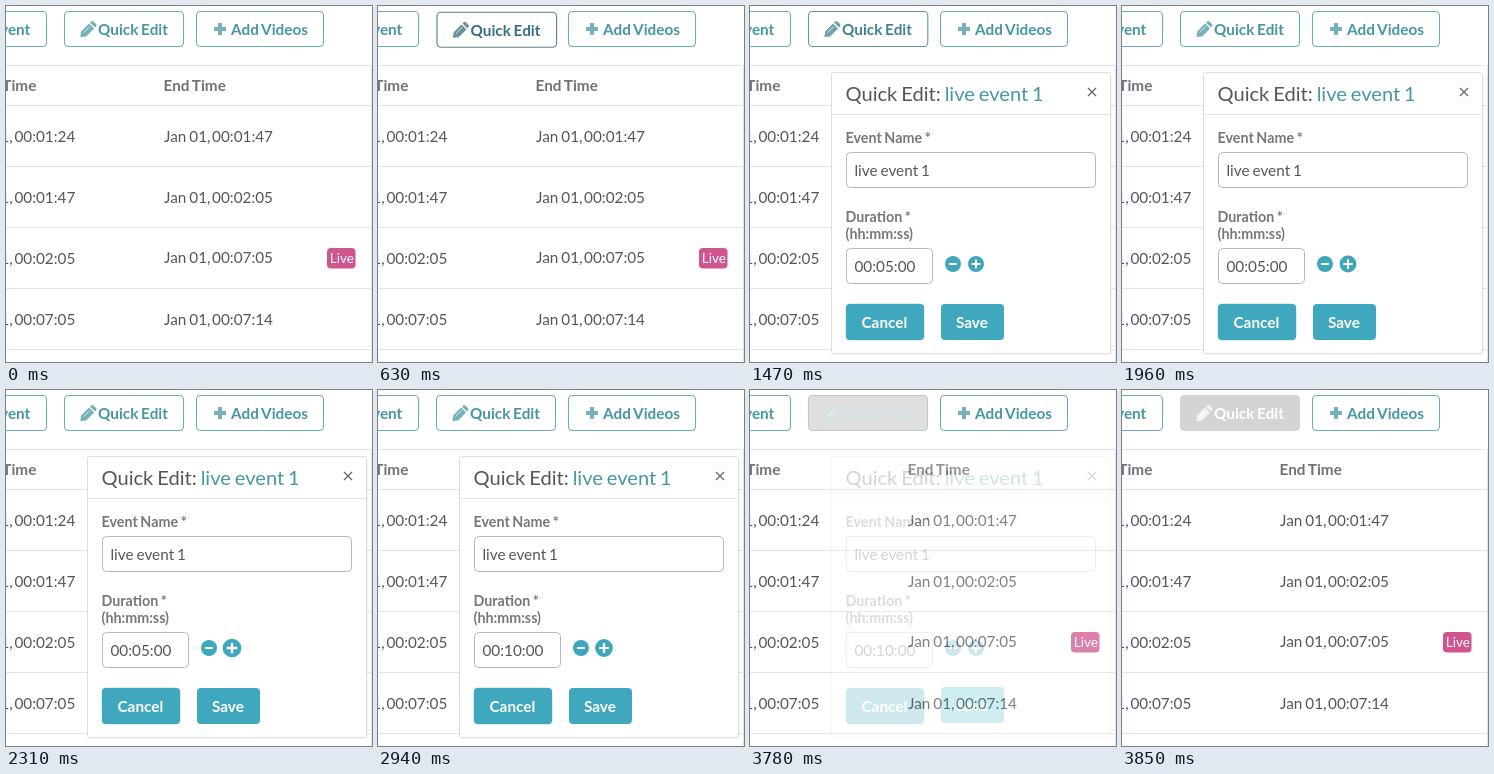
Recreate the animation shown at these times as an HTML page. Size 366 px wide and 356 px high, loop 4760 ms.

```html
<!DOCTYPE html>
<html lang="en">
<head>
<meta charset="utf-8">
<title>Quick edit panel</title>
<style>
  html, body { margin: 0; width: 100%; height: 100%; overflow: hidden; background: #fff; }
  svg { display: block; width: 366px; height: 356px; font: 15.3px Lato, sans-serif; fill: #565656; }
  text { white-space: pre; word-spacing: -.06em; }
  .b { font-weight: 700; }
  .teal { fill: #4697a3; }
  .label { font-weight: 700; font-size: 14.3px; fill: #777; }
  .white { fill: #fff; }
  .box { fill: #fff; stroke: #66adb6; stroke-width: 1.1; }
  .field { fill: #fff; stroke: #b9b9b9; }
  .rule { stroke: #e4e4e4; fill: none; }
  .icon { opacity: .75; }
</style>
</head>
<body>
<svg viewBox="0 0 366 356">
  <rect class="box" x="-60.5" y="5.5" width="101" height="35" rx="4"/>
  <text class="b teal" x="24.3" y="29" text-anchor="end">Edit Event</text>

  <g id="edit">
    <rect id="editBox" x="58.5" y="5.5" height="35" rx="4" stroke-width="1.1"/>
    <g id="editInk">
      <path class="icon" d="M74.3 31 L75.2 25.4 L83 17.6 L88 22.6 L80.2 30.4 Z M84 16.6 L85.3 15.4 Q86.4 14.6 87.4 15.5 L90 18.1 Q90.9 19.2 90.1 20.3 L89 21.6 Z"/>
      <path d="M77.6 26.6 L83.5 20.7" stroke="#fff" stroke-width=".8"/>
      <text class="b" x="92" y="29">Quick Edit</text>
    </g>
  </g>

  <rect class="box" x="190.5" y="5.5" width="127" height="35" rx="4"/>
  <path class="teal icon" d="M212 17h4v4h4v4h-4v4h-4v-4h-4v-4h4z"/>
  <text class="b teal" x="225" y="29">Add Videos</text>

  <path class="rule" d="M0 59.5H365.5V356"/>
  <g class="b" fill="#727272">
    <text x="30.3" y="85" text-anchor="end">Start Time</text>
    <text x="157.6" y="85">End Time</text>
  </g>
  <g id="rows"></g>
  <rect x="321" y="242" width="28.5" height="20.5" rx="4" fill="#d0558f"/>
  <text class="white" x="323.7" y="257" font-size="13.6">Live</text>

  <g id="panel">
    <rect x="81" y="67" width="281" height="282" rx="2" fill="#000" opacity=".035"/>
    <rect x="81.5" y="66.5" width="279" height="281" rx="2" fill="#fff" stroke="#dedede"/>
    <path class="rule" d="M82 108.5H360"/>
    <text x="95.5" y="95" font-size="20.1">Quick Edit: <tspan class="teal">live event 1</tspan></text>
    <path d="M338 82l8 8m0-8l-8 8" stroke="#666" stroke-width="1.3"/>
    <text class="label" x="95.5" y="137">Event Name *</text>
    <rect class="field" x="96.5" y="146.5" width="249" height="35" rx="4"/>
    <text x="104.5" y="170">live event 1</text>
    <text class="label" x="95.5" y="216">Duration *</text>
    <text class="label" x="95.5" y="233">(hh:mm:ss)</text>
    <rect class="field" x="96.5" y="242.5" width="86" height="35" rx="4"/>
    <text id="length" x="104.5" y="266"></text>
    <g fill="#3fa6bb" stroke="#fff" stroke-width="2">
      <g><circle cx="203" cy="258" r="8" stroke="none"/><path d="M199 258h8"/></g>
      <g id="plus"><circle r="8" stroke="none"/><path d="M-4.5 0h9M0-4.5v9"/></g>
    </g>
    <rect x="95.5" y="297.5" width="79" height="37" rx="4.5" fill="#b7dfe8"/>
    <rect x="96" y="298" width="78" height="36" rx="4" fill="#3fa8bf"/>
    <text class="b white" x="111.5" y="321.5">Cancel</text>
    <g id="save">
      <rect id="saveBox" x="191" y="298" width="63" height="36" rx="4"/>
      <text class="b white" x="206" y="321.5">Save</text>
    </g>
  </g>
</svg>
<script>
  const LOOP = 4760, STEP = 70;
  const $ = id => document.getElementById(id);

  const times = ['00:01:24', '00:01:47', '00:02:05', '00:07:05', '00:07:14'];
  const stamp = time => `Jan 01, <tspan dx="-1.4">${time}</tspan>`;
  $('rows').innerHTML = times.slice(0, 4).map((start, i) => {
    const y = 99.5 + 61 * i;
    return `<path class="rule" d="M0 ${y}H365"/>
      <text x="69.3" y="${y + 36.5}" text-anchor="end">${stamp(start)}</text>
      <text x="158" y="${y + 36.5 - (i === 2)}">${stamp(times[i + 1])}</text>`;
  }).join('') + '<path class="rule" d="M0 343.5H365"/>';

  const ramp = (t, a, b) => Math.min(1, Math.max(0, (t - a) / (b - a)));
  const pulse = (t, a, b, c, d) => ramp(t, a, b) - ramp(t, c, d);
  const mix = (from, to, k) =>
    `rgb(${from.map((v, i) => Math.round(v + (to[i] - v) * k))})`;

  const TEAL = [70, 151, 163], DARK = [56, 110, 126], WHITE = [255, 255, 255];
  const EDGE = [102, 173, 182], DARK_EDGE = [84, 130, 144], GREY = [212, 212, 212];
  const SAVE = [63, 168, 191], BRIGHT = [70, 187, 215];

  function draw(t) {
    const hover = pulse(t, 560, 630, 1330, 1610);
    const press = pulse(t, 560, 630, 630, 840);
    const off = ramp(t, 3570, 3850);
    const plus = pulse(t, 1890, 2100, 2870, 3080);
    const save = ramp(t, 3150, 3360);

    $('edit').setAttribute('transform', `translate(${0.5 * press} ${0.8 * press})`);
    $('editBox').setAttribute('width', 119 + 0.6 * hover);
    $('editBox').style.fill = mix(WHITE, GREY, off);
    $('editBox').style.stroke = off ? mix(EDGE, GREY, off) : mix(EDGE, DARK_EDGE, hover);
    $('editInk').style.fill = off ? mix(TEAL, WHITE, off) : mix(TEAL, DARK, hover);
    $('panel').style.opacity = pulse(t, 700, 910, 3570, 3850);
    $('length').textContent = t < 2380 ? '00:05:00' : '00:10:00';
    $('plus').setAttribute('transform', `translate(226 258) scale(${1 + 0.17 * plus})`);
    $('save').setAttribute('transform', `translate(0 ${-save})`);
    $('saveBox').style.fill = mix(SAVE, BRIGHT, save);
  }

  const begin = performance.now();
  function tick() {
    const t = (performance.now() - begin) % LOOP;
    draw(Math.floor(t / STEP) * STEP);
    requestAnimationFrame(tick);
  }
  draw(0);
  requestAnimationFrame(tick);
</script>
</body>
</html>
```
